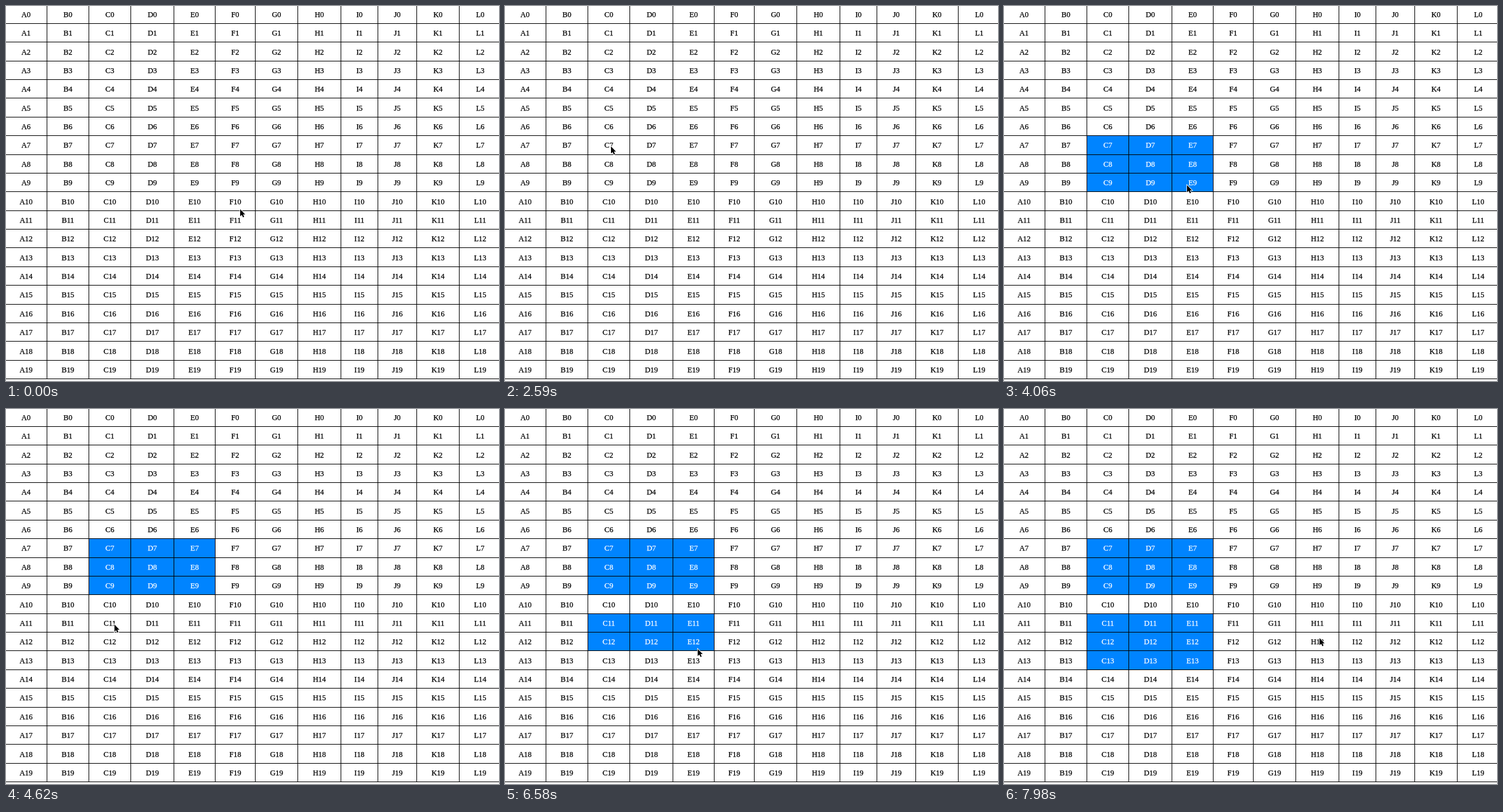
Write an HTML page with a canvas that moves like this. It is 800 px wide and 609 px high and loops after 8000 ms.

```html
<!DOCTYPE html>
<html lang="en">
<head>
<meta charset="utf-8">
<title>Cell selection</title>
<style>
html, body { margin: 0; width: 100%; height: 100%; overflow: hidden; background: #fff; }
canvas { display: block; }
</style>
</head>
<body>
<canvas width="800" height="609"></canvas>
<script>
const ctx = document.querySelector('canvas').getContext('2d');
const LOOP = 8000, STEP = 70, ROWS = 20, PITCH = 30.37;
const letters = 'ABCDEFGHIJKL';
const colEdge = [-2, 66, 134, 202, 272, 339, 404, 473, 543, 603, 666, 735, 803];
const rowEdge = r => Math.round(PITCH * r - 2.37);

// Pointer moves, each from where the last one ended
const home = { x: 380, y: 330 };
const moves = [
  { from: 0, to: 840, x: 237, y: 236 },
  { from: 1050, to: 1540, x: 190, y: 231 },
  { from: 2030, to: 2590, x: 172, y: 228 },
  { from: 2870, to: 3640, x: 297, y: 291 },
  { from: 4060, to: 4620, x: 176, y: 350 },
  { from: 5950, to: 6790, x: 338, y: 397 },
  { from: 7280, to: 7980, x: 512, y: 372 }
];

// Times of mouse press and release
const drags = [{ from: 2730, to: 3640 }, { from: 5810, to: 6790 }];

function pointer(t) {
  let { x, y } = home;
  for (const m of moves) {
    const u = Math.min(1, Math.max(0, (t - m.from) / (m.to - m.from)));
    const s = u * u * (3 - 2 * u);
    x += (m.x - x) * s;
    y += (m.y - y) * s;
  }
  return { x, y };
}

function cellAt(t) {
  const { x, y } = pointer(t);
  let col = 0, row = 0;
  while (colEdge[col + 1] <= x) col++;
  while (rowEdge(row + 1) <= y) row++;
  return { col, row };
}

// Cell ranges from the pressed cell to the one under the pointer
function selections(t) {
  return drags.filter(d => t >= d.from).map(d => {
    const a = cellAt(d.from), b = cellAt(Math.min(t, d.to));
    return { c0: Math.min(a.col, b.col), c1: Math.max(a.col, b.col),
             r0: Math.min(a.row, b.row), r1: Math.max(a.row, b.row) };
  });
}

function drawTable(picked) {
  ctx.fillStyle = '#fff';
  ctx.fillRect(0, 0, 800, 609);
  ctx.fillStyle = '#0084ff';
  for (const s of picked) {
    const x = colEdge[s.c0], y = rowEdge(s.r0);
    ctx.fillRect(x, y, colEdge[s.c1 + 1] - x, rowEdge(s.r1 + 1) - y);
  }
  ctx.fillStyle = '#000';
  for (const x of colEdge) ctx.fillRect(x, 0, 1, rowEdge(ROWS));
  for (let r = 1; r <= ROWS; r++) ctx.fillRect(0, rowEdge(r), 800, 1);

  ctx.font = '12.3px "Liberation Serif", "Times New Roman", serif';
  ctx.textAlign = 'center';
  ctx.lineWidth = 0.25;
  for (let c = 0; c < letters.length; c++) {
    const x = (colEdge[c] + colEdge[c + 1] + 1) / 2;
    for (let r = 0; r < ROWS; r++) {
      const on = picked.some(s => c >= s.c0 && c <= s.c1 && r >= s.r0 && r <= s.r1);
      ctx.fillStyle = ctx.strokeStyle = on ? '#fff' : '#000';
      ctx.fillText(letters[c] + r, x, 17.9 + PITCH * r);
      ctx.strokeText(letters[c] + r, x, 17.9 + PITCH * r);
    }
  }
}

const arrow = new Path2D('M0 0V11.6L2.7 9.2L4.6 13.2L6.5 12.3L4.7 8.4H8.2Z');

function drawPointer({ x, y }) {
  ctx.save();
  ctx.translate(x, y);
  ctx.strokeStyle = '#fff';
  ctx.lineWidth = 1.6;
  ctx.stroke(arrow);
  ctx.fillStyle = '#000';
  ctx.fill(arrow);
  ctx.restore();
}

function frame() {
  const t = Math.floor(performance.now() % LOOP / STEP) * STEP;
  drawTable(selections(t));
  drawPointer(pointer(t));
  requestAnimationFrame(frame);
}
frame();
</script>
</body>
</html>
```
